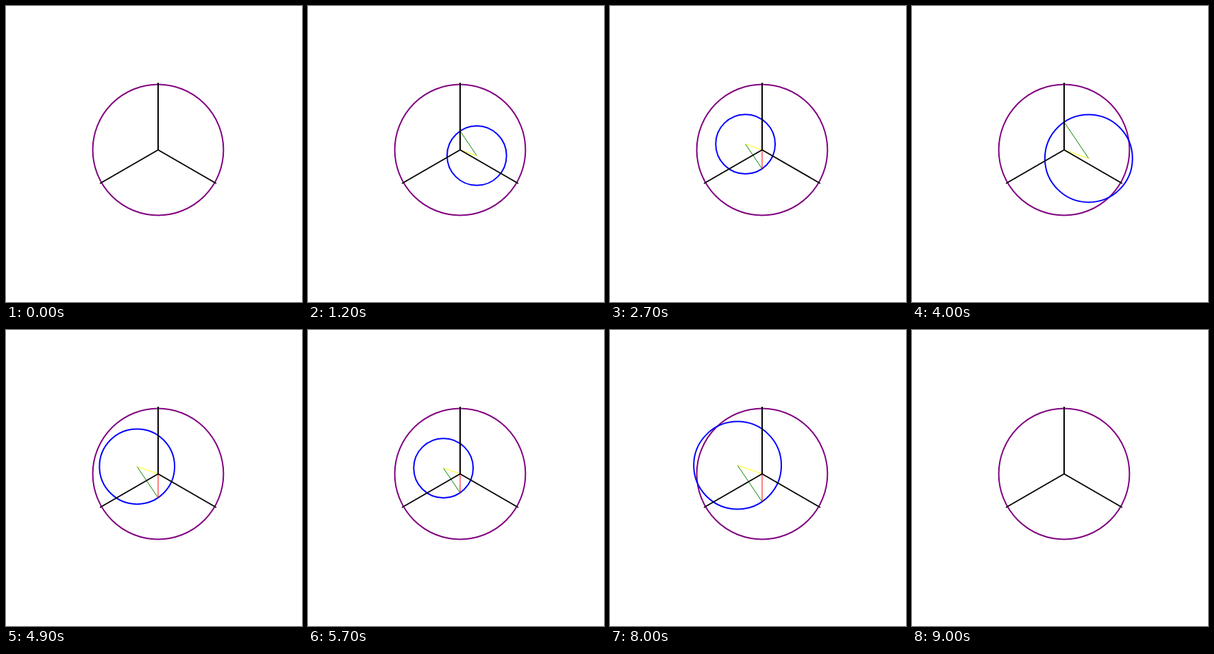
These frames come from a looping animation (432 px wide and 432 px high, 9100 ms). An HTML page:

```html
<!DOCTYPE html>
<html lang="en">
<head>
<meta charset="utf-8">
<title>Pulsating vectors</title>
<style>
  html, body { margin: 0; width: 100%; height: 100%; overflow: hidden; background: #fff; }
  svg { display: block; width: 100vw; height: 100vh; }
</style>
</head>
<body>
<svg viewBox="0 0 432 432">
  <g transform="translate(222 210)" fill="none">
    <circle r="95.4" stroke="purple" stroke-width="2"/>
    <circle id="swing" stroke="blue" stroke-width="2"/>
    <line id="red" stroke="red"/>
    <line id="green" stroke="green"/>
    <line id="yellow" stroke="yellow"/>
    <g stroke="black" stroke-width="2" stroke-linecap="square">
      <path id="axis" d="M0 0V-97"/>
      <use href="#axis" transform="rotate(120)"/>
      <use href="#axis" transform="rotate(240)"/>
    </g>
  </g>
</svg>
<script>
const STEP = 100, STEPS = 91, STEPS_PER_CYCLE = 30;
const TIP = { x: 0, y: -47 };
const HUB = { x: 41.4, y: 14.4 };
const RADIUS = 73.8;

const byId = id => document.getElementById(id);

function set(id, attrs) {
  for (const name in attrs) byId(id).setAttribute(name, attrs[name].toFixed(3));
}

function setLine(id, from, to, scale) {
  set(id, { x1: from.x * scale, y1: from.y * scale, x2: to.x * scale, y2: to.y * scale });
}

// Every vector pulses in phase, so one signed factor scales the whole figure.
function draw(time) {
  const step = Math.floor(time / STEP) % STEPS;
  const pulse = Math.sin(2 * Math.PI * step / STEPS_PER_CYCLE);
  const origin = { x: 0, y: 0 };
  setLine('red', origin, TIP, pulse);
  setLine('green', TIP, HUB, pulse);
  setLine('yellow', origin, HUB, pulse);
  set('swing', { cx: HUB.x * pulse, cy: HUB.y * pulse, r: RADIUS * Math.abs(pulse) });
}

const start = performance.now();
function tick() {
  draw(performance.now() - start);
  requestAnimationFrame(tick);
}
tick();
</script>
</body>
</html>
```
